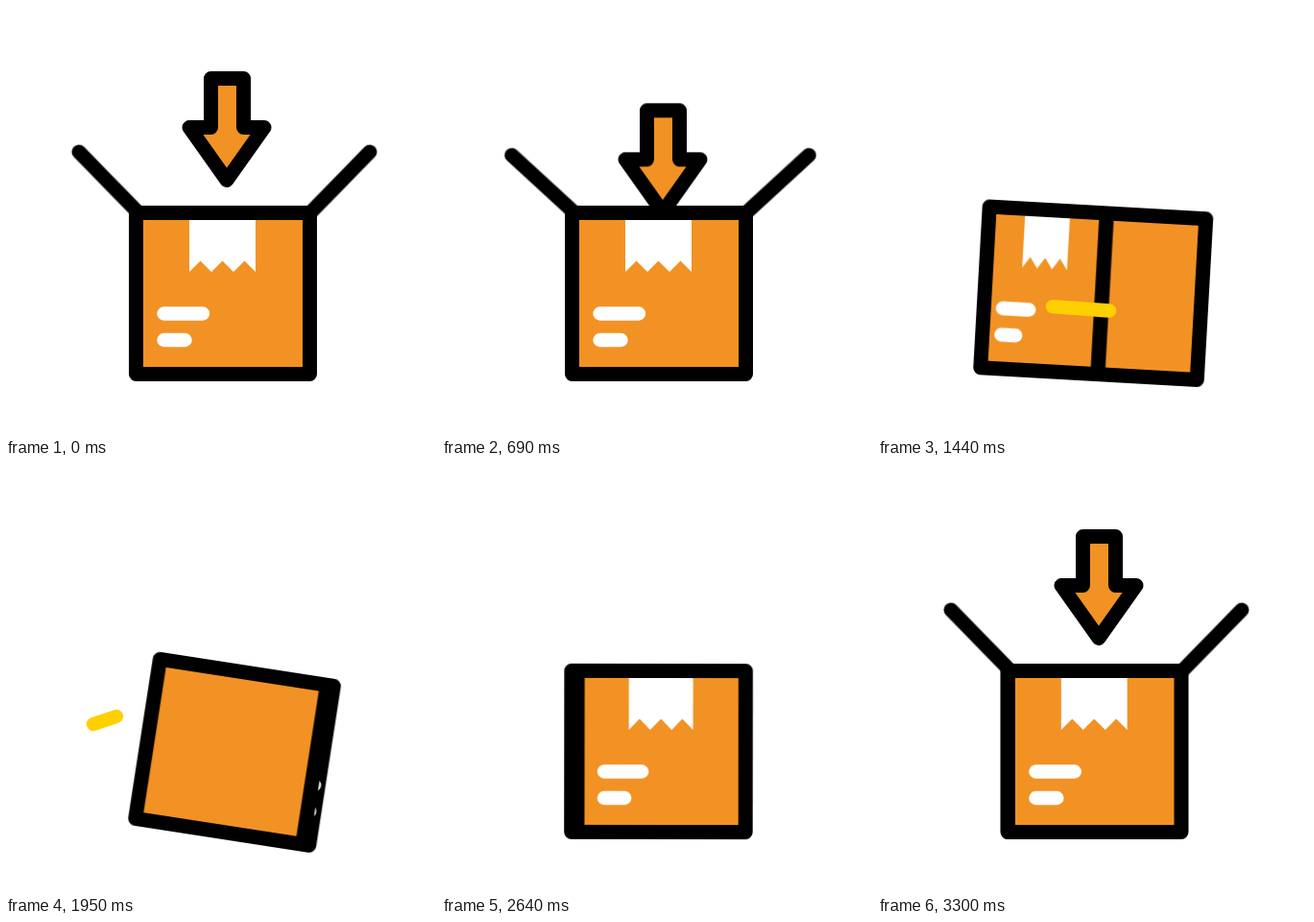
Animation, 448 px wide and 448 px high, one loop 3.63 s. Source, as an HTML page without scripts:

```html
<!DOCTYPE html>
<html lang="en">
<head>
<meta charset="utf-8">
<title>Packing a box</title>
<style>
  /* Box edges are measured from the middle of the box's base. */
  @property --left  { syntax: "<number>"; inherits: true; initial-value: -90.5; }
  @property --right { syntax: "<number>"; inherits: true; initial-value: 90.5; }
  @property --seam  { syntax: "<number>"; inherits: true; initial-value: 90.5; }
  @property --turn  { syntax: "<number>"; inherits: true; initial-value: 0; }
  @property --head  { syntax: "<number>"; inherits: true; initial-value: 0; }
  @property --tail  { syntax: "<number>"; inherits: true; initial-value: 0; }

  html, body { margin: 0; width: 100%; height: 100%; overflow: hidden; background: #fff; }
  svg { display: block; width: 100%; height: 100%; }

  svg, .box, .arrow, .flap, .flaps, .swoosh {
    animation-duration: 3630ms;
    animation-iteration-count: infinite;
    animation-timing-function: cubic-bezier(.33, 0, .67, 1);
  }
  svg { animation-name: seam, bulge, turn, head, tail; }

  .ink { fill: #f29224; stroke: #000; stroke-width: 15; stroke-linejoin: round; stroke-linecap: round; }
  .face * { vector-effect: non-scaling-stroke; }
  .tape { fill: #fff; }
  .pill { fill: none; stroke: #fff; stroke-width: 14.4; stroke-linecap: round; }

  .box { transform-origin: 226px 383.5px; animation-name: tilt; }
  .face {
    transform: translateX(calc((226 + var(--from)) * 1px))
               scaleX(calc((var(--to) - var(--from)) / 181));
  }
  /* The seam closes the front first, then opens it again from the right. */
  .front {
    --from: calc(var(--left) + (var(--seam) - var(--left)) * var(--turn));
    --to: calc(var(--seam) + (var(--right) - var(--seam)) * var(--turn));
  }
  .side {
    --from: calc(var(--seam) + (var(--left) - var(--seam)) * var(--turn));
    --to: calc(var(--right) + (var(--seam) - var(--right)) * var(--turn));
  }

  .arrow { animation-name: drop; }
  .flaps { animation-name: tuck; }
  .flap { animation-name: swing; }
  .swoosh {
    fill: none; stroke: #ffd000; stroke-width: 14.4;
    stroke-linecap: round; stroke-linejoin: round;
    stroke-dasharray: calc((var(--head) - var(--tail)) * 1px) 300px;
    stroke-dashoffset: calc(var(--tail) * -1px);
    animation-name: flash;
  }

  @keyframes seam {
    0%, 28.926% { --seam: 90.5; }
    50.96% { --seam: -90.5; }
    50.97% { --seam: 90.5; }
    75.207%, 100% { --seam: -90.5; }
  }
  @keyframes turn {
    0%, 50.96% { --turn: 0; }
    50.97%, 100% { --turn: 1; }
  }
  @keyframes bulge {
    0%, 28.926% { --left: -90.5; --right: 90.5; }
    40.083% { --left: -119.5; --right: 106.5; }
    51.24%, 52.342% { --left: -91; --right: 90; }
    61.983% { --left: -113; --right: 104; }
    73.554%, 100% { --left: -91; --right: 90; }
  }
  @keyframes tilt {
    0% { transform: rotate(0deg); }
    28.926% { transform: rotate(0deg); animation-timing-function: cubic-bezier(.52, 0, .67, 1); }
    51.24% { transform: rotate(9.1deg); animation-timing-function: cubic-bezier(.33, 0, .55, 1); }
    74.38%, 100% { transform: rotate(0deg); }
  }
  @keyframes drop {
    0% { transform: translateY(0); }
    9.091% { transform: translateY(-18px); animation-timing-function: cubic-bezier(.33, 0, .67, .33); }
    14.876% { transform: translateY(-2px); animation-timing-function: cubic-bezier(.33, .22, .67, .56); }
    19.008% { transform: translateY(33px); animation-timing-function: cubic-bezier(.33, .19, .67, .52); }
    24.793%, 74.37% { transform: translateY(150px); }
    74.38% { transform: translateY(-198px); }
    90.909%, 100% { transform: translateY(0); }
  }
  @keyframes swing {
    0% { transform: rotate(45.7deg); }
    13.223%, 18.182% { transform: rotate(35.9deg); }
    24.793%, 78.512% { transform: rotate(180deg); }
    90.909%, 100% { transform: rotate(45.7deg); }
  }
  @keyframes tuck {
    0%, 28.5% { opacity: 1; }
    28.51%, 78.5% { opacity: 0; }
    78.51%, 100% { opacity: 1; }
  }
  @keyframes head {
    0%, 34.298% { --head: 0; }
    50.826%, 100% { --head: 100; }
  }
  @keyframes tail {
    0%, 41.322% { --tail: 0; }
    56.9%, 100% { --tail: 100; }
  }
  @keyframes flash {
    0%, 34.5% { opacity: 0; }
    34.51%, 56.5% { opacity: 1; }
    56.51%, 100% { opacity: 0; }
  }
</style>
</head>
<body>
<svg viewBox="0 0 448 448">
  <path class="arrow ink" d="M213.5 75.5H247.5V126.5H269L230 181.5L191 126.5H213.5Z"/>

  <g class="flaps">
    <g transform="translate(137 214.5)"><path class="flap ink" d="M0 0H-87.3"/></g>
    <g transform="translate(318 214.5) scale(-1 1)"><path class="flap ink" d="M0 0H-87.3"/></g>
  </g>

  <g class="box">
    <g class="face front">
      <rect class="ink" y="215.5" width="181" height="168"/>
      <path class="tape" d="M55.5 223V277L67 265.5L78.5 277L90 265.5L101.5 277L113 265.5L124.5 277V223Z"/>
      <path class="pill" d="M29 320.5H69.5M29 348H51"/>
    </g>
    <g class="face side">
      <rect class="ink" y="215.5" width="181" height="168"/>
    </g>
  </g>

  <path class="swoosh" pathLength="100"
        d="M241 317.5L180 313C110 308 69 303 69 287S84 273.5 91 271L115 263"/>
</svg>
</body>
</html>
```
